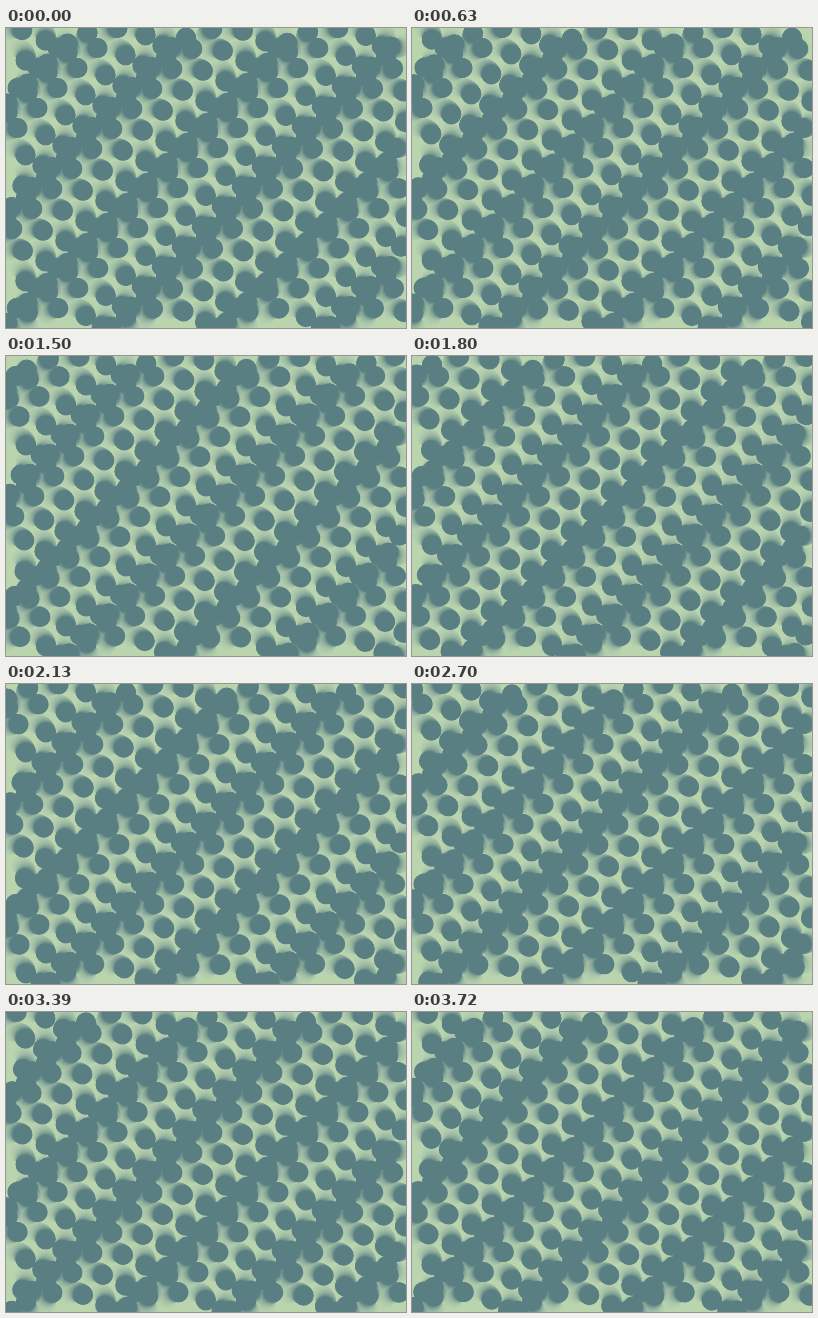
An HTML page with a canvas that plays this animation: 400 by 300 pixels, repeating every 3750 ms.

```html
<!DOCTYPE html>
<html lang="en">
<head>
<meta charset="utf-8">
<title>Orbiting dots</title>
<style>
  html, body { margin: 0; width: 100%; height: 100%; overflow: hidden; background: #b8d0ab; }
  canvas { display: block; width: 400px; height: 300px; }
</style>
</head>
<body>
<canvas id="stage" width="400" height="300"></canvas>
<script>
  const W = 400, H = 300;
  const CELL = 20, ORBIT = 10, DOT = 10;
  const STEP_MS = 30, STEPS = 125;
  const START = 4.25;
  const VEIL = 'rgba(184, 208, 171, 0.08)';
  const INK = '#5a7f82';

  const ctx = document.getElementById('stage').getContext('2d');
  ctx.fillStyle = '#b8d0ab';
  ctx.fillRect(0, 0, W, H);

  // Each pass fades the previous dots a little, which leaves the soft trails.
  function paint(step) {
    const turn = START + 2 * Math.PI * step / STEPS;
    ctx.fillStyle = VEIL;
    ctx.fillRect(0, 0, W, H);
    ctx.fillStyle = INK;
    ctx.beginPath();
    for (let x = CELL / 2; x < W; x += CELL) {
      for (let y = CELL / 2; y < H; y += CELL) {
        const angle = turn + x + y;
        const cx = x + ORBIT * Math.cos(angle);
        const cy = y + ORBIT * Math.sin(angle);
        ctx.moveTo(cx + DOT, cy);
        ctx.arc(cx, cy, DOT, 0, 2 * Math.PI);
      }
    }
    ctx.fill();
  }

  // One full turn of passes is enough to rebuild the trails after a jump.
  let last = -Infinity;
  function show(step) {
    if (step === last) return;
    const first = step - STEPS + 1;
    const from = step > last ? Math.max(last + 1, first) : first;
    for (let s = from; s <= step; s++) paint(s);
    last = step;
  }

  const t0 = performance.now();
  function tick() {
    show(Math.floor((performance.now() - t0) / STEP_MS));
    requestAnimationFrame(tick);
  }
  show(0);
  requestAnimationFrame(tick);
</script>
</body>
</html>
```
